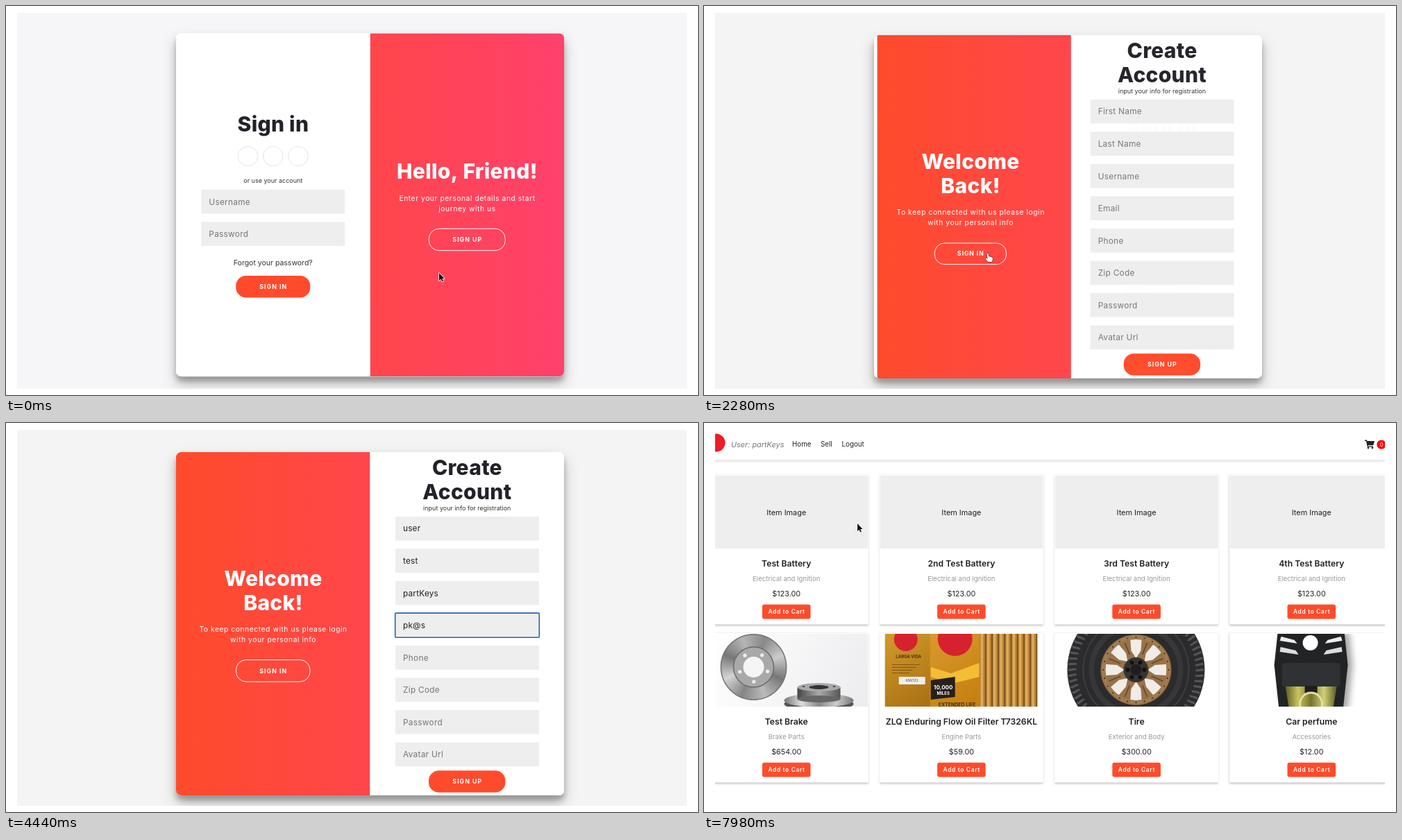
Write an HTML page with a canvas that moves like this. It is 997 px wide and 561 px high and loops after 8 s.

```html
<!DOCTYPE html>
<html lang="en">
<head>
<meta charset="utf-8">
<title>Sign up flow</title>
<style>
html, body { margin: 0; width: 100%; height: 100%; overflow: hidden; background: #fff; }
canvas { display: block; }
</style>
</head>
<body>
<canvas id="stage" width="997" height="561"></canvas>
<script>
const ctx = document.getElementById('stage').getContext('2d');
const LOOP = 8000, SHIFT_AT = 450, SHOP_AT = 6990;
const CARD = { x: 245, y: 42, w: 559, h: 495 }, HALF = CARD.w / 2;
const ORANGE = '#ff4b2b';
const SLIDES = [{ at: 1268, to: 1 }, { at: 2258, to: 0 }, { at: 2770, to: 1 }];
const SLIDE_MS = 260;

const clamp = v => Math.max(0, Math.min(1, v));
const smooth = v => v * v * (3 - 2 * v);
const easeInOut = v => v < .5 ? 2 * v * v : 1 - 2 * (1 - v) ** 2;

function text(str, x, y, size, o = {}) {
  ctx.font = `${o.style || ''} ${o.weight || 400} ${size}px Inter, sans-serif`;
  ctx.letterSpacing = (o.gap || 0) + 'px';
  ctx.textAlign = o.align || 'center';
  ctx.fillStyle = o.color || '#333';
  const nudge = ctx.textAlign === 'center' ? (o.gap || 0) / 2 : 0;
  ctx.fillText(str, x + nudge, y + size * .364);
}
function rect(x, y, w, h, color) {
  ctx.fillStyle = color;
  ctx.fillRect(x, y, w, h);
}
function roundPath(x, y, w, h, r) {
  ctx.beginPath();
  ctx.roundRect(x, y, w, h, r);
}
function poly(points, color) {
  ctx.beginPath();
  points.forEach(([x, y]) => ctx.lineTo(x, y));
  ctx.closePath();
  ctx.fillStyle = color;
  ctx.fill();
}
function ellipse(x, y, rx, ry, color) {
  ctx.beginPath();
  ctx.ellipse(x, y, rx, ry, 0, 0, Math.PI * 2);
  ctx.fillStyle = color;
  ctx.fill();
}
const disc = (x, y, r, color) => ellipse(x, y, r, r, color);
function ring(x, y, r, width, color) {
  ctx.beginPath();
  ctx.arc(x, y, r, 0, Math.PI * 2);
  ctx.lineWidth = width;
  ctx.strokeStyle = color;
  ctx.stroke();
}
function gradient(x0, y0, x1, y1, ...colors) {
  const g = ctx.createLinearGradient(x0, y0, x1, y1);
  colors.forEach((c, i) => g.addColorStop(i / (colors.length - 1), c));
  return g;
}
function scoped(draw) {
  ctx.save();
  draw();
  ctx.restore();
}
function clipRect(x, y, w, h) {
  ctx.beginPath();
  ctx.rect(x, y, w, h);
  ctx.clip();
}

// ---------- sign in / sign up card ----------

function slideState(t) {
  let state = { p: 0, back: false };
  for (const s of SLIDES) {
    if (t < s.at) break;
    const e = easeInOut(clamp((t - s.at) / SLIDE_MS));
    state = { p: s.to ? e : 1 - e, back: !s.to };
  }
  return state;
}
function pressScale(t, release) {
  const down = clamp((t - release + 80) / 35), up = clamp((t - release) / 60);
  return 1 - .05 * (down - up);
}
const title = (str, x, y, color = '#222228') =>
  text(str, x, y, 30, { weight: 800, gap: .3, color });

function button(label, x, y, w, ghost, scale = 1) {
  scoped(() => {
    ctx.translate(x, y);
    ctx.scale(scale, scale);
    roundPath(-w / 2, -15.8, w, 31.6, 14.6);
    if (ghost) {
      ctx.strokeStyle = '#fff';
      ctx.lineWidth = 1;
      ctx.stroke();
    } else {
      ctx.fillStyle = ORANGE;
      ctx.fill();
    }
    text(label, 0, 0, 8.8, { weight: 700, gap: 1, color: '#fff' });
  });
}
function field(label, x, y) {
  rect(x, y, 207, 34.6, '#eee');
  if (label) text(label, x + 11, y + 17.4, 11.8, { align: 'left', gap: .3, color: '#777' });
}

const SIGN_UP_FIELDS = [
  { label: 'First Name', value: 'user', from: 3300, to: 3500 },
  { label: 'Last Name', value: 'test', from: 3600, to: 3800 },
  { label: 'Username', value: 'partKeys', from: 3890, to: 4260 },
  { label: 'Email', value: 'pk@store.invalid', from: 4340, to: 4820 },
  { label: 'Phone', value: '55500199', from: 4870, to: 5130 },
  { label: 'Zip Code', value: '123456', from: 5190, to: 5330 },
  { label: 'Password', value: '********', from: 5360, to: 5480 },
  { label: 'Avatar Url', value: 'NA', from: 5520, to: 5570 }
];
const FOCUS_AT = 3230, BLUR_AT = 6640;

function signUpField(f, i, x, t) {
  const y = 134.8 + i * 46.54;
  const len = f.value.length;
  const typed = t < f.from ? '' : f.value.slice(0, 1 + Math.floor(clamp((t - f.from) / (f.to - f.from)) * (len - 1)));
  field(typed ? '' : f.label, x, y);
  let end = x + 11;
  if (f.label === 'Password') {
    for (let k = 0; k < typed.length; k++) disc(x + 12.5 + k * 3.5, y + 17.2, .95, '#222');
    end += typed.length * 3.5;
  } else if (typed) {
    text(typed, x + 11, y + 17.4, 11.8, { align: 'left', gap: .2, color: '#222' });
    end += ctx.measureText(typed).width;
  }
  const start = i ? SIGN_UP_FIELDS[i - 1].to + 40 : FOCUS_AT;
  const stop = i < 7 ? f.to + 40 : BLUR_AT;
  if (t >= start && t < stop) {
    roundPath(x - .3, y - .3, 207.6, 35.2, 1.5);
    ctx.lineWidth = 1.6;
    ctx.strokeStyle = '#2463b8';
    ctx.stroke();
    if (Math.floor(t / 200) % 2) rect(end + .5, y + 10.5, .9, 14, '#222');
  }
}

function signInForm(x) {
  rect(x, CARD.y, HALF, CARD.h, '#fff');
  const mid = x + HALF / 2;
  title('Sign in', mid, 173);
  [-36.3, 0, 36.3].forEach(dx => ring(mid + dx, 219.4, 14.2, .8, '#ddd'));
  text('or use your account', mid, 255, 9);
  field('Username', x + 36.3, 267.7);
  field('Password', x + 36.3, 314.2);
  text('Forgot your password?', mid, 373.4, 10.5);
  button('SIGN IN', mid, 407.6, 107, false);
}
function signUpForm(x, t) {
  rect(x, CARD.y, HALF, CARD.h, '#fff');
  const mid = x + HALF / 2;
  title('Create', mid, 64);
  title('Account', mid, 99);
  text('input your info for registration', mid, 122.3, 9);
  SIGN_UP_FIELDS.forEach((f, i) => signUpField(f, i, x + 36.5, t));
  button('SIGN UP', mid, 517, 110.5, false, pressScale(t, 6680));
}
function overlay(p, t) {
  const x = CARD.x + HALF * (1 - p);
  clipRect(x, CARD.y, HALF, CARD.h);
  rect(x, CARD.y, HALF, CARD.h, gradient(CARD.x, 0, CARD.x + CARD.w, 0, ORANGE, '#ff416c'));
  const note = (str, cx, y) => text(str, cx, y, 10.3, { gap: .55, color: '#fff' });

  const left = CARD.x + HALF / 2 - HALF * .2 * (1 - p);
  title('Welcome', left, 223.8, '#fff');
  title('Back!', left, 258.8, '#fff');
  note('To keep connected with us please login', left, 297.6);
  note('with your personal info', left, 312.2);
  button('SIGN IN', left, 357.3, 106.5, true, pressScale(t, 2258));

  const right = CARD.x + HALF * 1.5 + HALF * .2 * p;
  title('Hello, Friend!', right, 241, '#fff');
  note('Enter your personal details and start', right, 280.3);
  note('journey with us', right, 294.9);
  button('SIGN UP', right, 339.7, 110, true, pressScale(t, 1268) * pressScale(t, 2770));
}
function shadow(dy, blur, alpha) {
  ctx.shadowColor = `rgba(0,0,0,${alpha})`;
  ctx.shadowOffsetY = dy;
  ctx.shadowBlur = blur;
  roundPath(CARD.x, CARD.y, CARD.w, CARD.h, 7.3);
  ctx.fillStyle = '#fff';
  ctx.fill();
}
function accountPage(t) {
  rect(16, 10, 965, 542, t < SHIFT_AT ? '#f6f6f8' : '#f4f4f4');
  if (t < SHIFT_AT) ctx.translate(0, -2.8);
  scoped(() => {
    shadow(10.2, 20.4, .25);
    shadow(7.3, 7.3, .22);
  });
  roundPath(CARD.x, CARD.y, CARD.w, CARD.h, 7.3);
  ctx.clip();
  const { p, back } = slideState(t);
  const x = CARD.x + HALF * p;
  signInForm(x);
  if (p > (back ? .375 : .499)) scoped(() => {
    ctx.globalAlpha = back ? p : 1;
    signUpForm(x, t);
  });
  scoped(() => overlay(p, t));
}

// ---------- shop page ----------

function brakePicture(x, y) {
  rect(x, y, 220, 105, gradient(x, y, x + 220, y + 105, '#ffffff', '#ececef'));
  const cx = x + 55, cy = y + 48;
  const metal = ctx.createConicGradient(.4, cx, cy);
  ['#777', '#bbb', '#858585', '#d4d4d4', '#777', '#b5b5b5', '#888', '#ccc', '#777']
    .forEach((c, i) => metal.addColorStop(i / 8, c));
  disc(cx, cy, 48, metal);
  ring(cx, cy, 47, 1.5, '#777');
  disc(cx, cy, 29, '#a9a9ab');
  ring(cx, cy, 29, 1.5, '#6b6b6b');
  disc(cx, cy, 15, '#f5f5f6');
  for (let i = 0; i < 5; i++) {
    const a = i * Math.PI * .4 + .3;
    disc(cx + 21 * Math.cos(a), cy + 21 * Math.sin(a), 2.6, '#eee');
  }
  const fx = x + 149;
  ellipse(fx, y + 101, 50, 10, '#555');
  ellipse(fx, y + 96, 50, 10, gradient(fx - 50, 0, fx + 50, 0, '#777', '#ddd', '#888', '#ccc', '#777'));
  rect(fx - 31, y + 77, 62, 17, gradient(fx - 31, 0, fx + 31, 0, '#444', '#aaa', '#555'));
  ellipse(fx, y + 94, 31, 5, '#666');
  ellipse(fx, y + 77, 31, 6, '#a8a8a8');
  ellipse(fx, y + 77, 14, 3, '#333');
  [-22, -10, 11, 22].forEach(dx => ellipse(fx + dx, y + 76, 2, 1, '#444'));
}
function filterPicture(x, y) {
  rect(x, y, 66, 105, gradient(x, y, x + 66, y + 105, '#d19a2b', '#a96f12'));
  rect(x + 65, y, 73, 105, gradient(x + 65, y, x + 138, y + 105, '#d89a2c', '#c57d0e'));
  poly([[x + 66, y + 48], [x + 95, y + 57], [x + 136, y + 42], [x + 136, y + 62], [x + 96, y + 72], [x + 66, y + 62]], '#f3bd36');
  rect(x + 136, y, 83, 105, '#bd8435');
  for (let i = 0; i < 9; i++) {
    rect(x + 138 + i * 9.2, y, 3.4, 105, '#dbac5d');
    rect(x + 144 + i * 9.2, y, 2, 105, '#7e501b');
  }
  disc(x + 30, y + 8, 17, '#d5222e');
  disc(x + 101, y + 7, 25, '#d5222e');
  text('LARGA VIDA', x + 34, y + 33, 6, { weight: 700, color: '#4d3311' });
  for (let i = 0; i < 4; i++) rect(x + 10, y + 44 + i * 4, 40 - i * 5, 1, '#7f5718');
  rect(x + 20, y + 62, 38, 11, '#eee');
  text('KM/123', x + 39, y + 67.5, 5, { color: '#444' });
  poly([[x + 66, y + 67], [x + 101, y + 62], [x + 101, y + 91], [x + 66, y + 95]], '#271f1a');
  text('10,000', x + 84, y + 77, 8, { weight: 700, color: '#fff' });
  text('MILES', x + 84, y + 86, 6, { weight: 700, color: '#fff' });
  text('EXTENDED LIFE', x + 104, y + 102, 7, { weight: 700, color: '#4a2c0b' });
}
function tirePicture(x, y) {
  const cx = x + 117.5, cy = y + 52;
  disc(cx, cy, 99, '#2b2b2d');
  for (let i = 0; i < 72; i++) {
    const a = i * Math.PI / 36;
    poly([[96, -.02], [100, .01], [87, .03], [85, 0]]
      .map(([r, d]) => [cx + r * Math.cos(a + d), cy + r * Math.sin(a + d)]), '#555558');
  }
  ring(cx, cy, 76, 2, '#3e3e41');
  ring(cx, cy, 64, 8, '#373739');
  disc(cx, cy, 51, '#8b673f');
  disc(cx, cy, 44, '#f1ece6');
  for (let i = 0; i < 8; i++) scoped(() => {
    ctx.translate(cx, cy);
    ctx.rotate(i * Math.PI / 4 + Math.PI / 8);
    poly([[8, -8], [28, -4], [46, -10], [46, 10], [28, 4], [8, 8]], '#98734a');
    rect(24, -1, 18, 2, '#6d4d2b');
  });
  ring(cx, cy, 47, 5, '#a17c50');
  for (let i = 0; i < 24; i++) {
    const a = i * Math.PI / 12;
    disc(cx + 47 * Math.cos(a), cy + 47 * Math.sin(a), 1.1, '#3a2b1b');
  }
  disc(cx, cy, 18, '#37332f');
  for (let i = 0; i < 6; i++) {
    const a = i * Math.PI / 3;
    disc(cx + 12 * Math.cos(a), cy + 12 * Math.sin(a), 3, '#111');
  }
  disc(cx, cy, 8, '#1e1e20');
}
function perfumePicture(x, y) {
  const cx = x + 117.5;
  ctx.shadowColor = 'rgba(0,0,0,.35)';
  ctx.shadowBlur = 10;
  ctx.shadowOffsetX = 7;
  poly([[cx - 48, y - 2], [cx + 48, y - 2], [cx + 53, y + 45], [cx + 46, y + 110], [cx - 46, y + 110], [cx - 53, y + 45]], '#222325');
  ctx.shadowColor = 'transparent';
  [-1, 1].forEach(s => {
    poly([[cx + s * 43, y + 4], [cx + s * 24, y + 9], [cx + s * 20, y + 14], [cx + s * 45, y + 10]], '#eee');
    poly([[cx + s * 44, y + 19], [cx + s * 22, y + 24], [cx + s * 18, y + 30], [cx + s * 45, y + 26]], '#ddd');
  });
  disc(cx - 1, y + 13, 11, '#fff');
  roundPath(cx - 42, y + 42, 84, 34, 4);
  ctx.fillStyle = '#303134';
  ctx.fill();
  poly([[cx - 37, y + 76], [cx + 37, y + 76], [cx + 32, y + 106], [cx - 32, y + 106]],
    gradient(cx - 37, 0, cx + 37, 0, '#5d5d24', '#c9c45e', '#76742c', '#d3cf77', '#5b5a22'));
  rect(cx - 9, y + 75, 18, 10, '#1c1d1e');
  ring(cx, y + 101, 16, 3, '#e4df9b');
}

const ELECTRIC = 'Electrical and Ignition';
const ITEMS = [
  ['Test Battery', ELECTRIC, '$123.00'],
  ['2nd Test Battery', ELECTRIC, '$123.00'],
  ['3rd Test Battery', ELECTRIC, '$123.00'],
  ['4th Test Battery', ELECTRIC, '$123.00'],
  ['Test Brake', 'Brake Parts', '$654.00', brakePicture, 16],
  ['ZLQ Enduring Flow Oil Filter T7326KL', 'Engine Parts', '$59.00', filterPicture, 8],
  ['Tire', 'Exterior and Body', '$300.00', tirePicture, 0],
  ['Car perfume', 'Accessories', '$12.00', perfumePicture, 0]
];

function itemCard([name, kind, price, picture, inset], i) {
  const x = .5 + (i % 4) * 252.2, y = 75 + Math.floor(i / 4) * 228, mid = x + 118.2;
  scoped(() => {
    ctx.shadowColor = 'rgba(0,0,0,.28)';
    ctx.shadowBlur = 3;
    ctx.shadowOffsetY = 1;
    rect(x, y, 236.4, 215.5, '#fff');
  });
  if (picture) scoped(() => {
    clipRect(x + 1, y + 1, 234.4, 105);
    picture(x + inset, y + 1);
  });
  else {
    rect(x + 1, y + 1, 234.4, 105, '#eee');
    text('Item Image', mid, y + 53.7, 10.9, { color: '#222' });
  }
  text(name, mid, y + 127.2, 12.2, { weight: 600, color: '#212121' });
  text(kind, mid, y + 149.8, 9.6, { color: '#999' });
  text(price, mid, y + 171.3, 10.8, { color: '#222' });
  roundPath(mid - 34.8, y + 186.8, 69.6, 20.6, 3);
  ctx.fillStyle = ORANGE;
  ctx.fill();
  text('Add to Cart', mid, y + 197.1, 8.3, { weight: 600, gap: .7, color: '#fff' });
}
function cartIcon(x, y) {
  poly([[x, y], [x + 3, y], [x + 3.5, y + 1.5], [x + 14, y + 1.5], [x + 12.4, y + 7.5], [x + 4.8, y + 7.5],
    [x + 5, y + 8.7], [x + 12, y + 8.7], [x + 12, y + 10], [x + 3.8, y + 10], [x + 2, y + 1.4], [x, y + 1.4]], '#222');
  disc(x + 5, y + 11.3, 1.4, '#222');
  disc(x + 11, y + 11.3, 1.4, '#222');
}
function shopPage() {
  disc(17.5, 28.5, 13, '#ee1c25');
  const link = (str, x) => text(str, x, 30.7, 9.8, { align: 'left', color: '#222' });
  text('User: partKeys', 39, 30.7, 10.9, { align: 'left', style: 'italic', color: '#777' });
  link('Home', 127);
  link('Sell', 168);
  link('Logout', 198.5);
  cartIcon(952, 24.5);
  disc(976, 31, 6.6, '#f00');
  text('0', 976.3, 31, 8, { color: '#fff' });
  rect(16, 53, 965, 4, gradient(0, 53, 0, 57, '#e6e6e6', '#f5f5f5'));
  ITEMS.forEach(itemCard);
}

// ---------- pointer ----------

const POINTER_PATH = [
  [450, 624, 385], [900, 663, 337], [1380, 663, 337], [2100, 409, 357], [2290, 409, 357],
  [2580, 617, 357], [2700, 663, 338], [2880, 663, 338], [3180, 692, 156], [5480, 692, 156],
  [5580, 693, 186], [5900, 778, 538], [6280, 664, 513], [7020, 664, 513], [7900, 221, 145]
];
const HAND_TIMES = [[820, 1420], [2040, 2330], [2660, 2910], [6220, SHOP_AT]];
const within = (t, [a, b]) => t >= a && t < b;

function pointerAt(t) {
  const path = POINTER_PATH, i = path.findIndex(k => k[0] > t);
  if (i === 0) return path[0].slice(1);
  if (i < 0) return path[path.length - 1].slice(1);
  const [t0, x0, y0] = path[i - 1], [t1, x1, y1] = path[i];
  const e = smooth((t - t0) / (t1 - t0));
  return [x0 + (x1 - x0) * e, y0 + (y1 - y0) * e];
}
function drawPointer(t) {
  if (within(t, [3280, 5500])) return;
  const hand = HAND_TIMES.some(span => within(t, span));
  const shape = hand
    ? 'M-1.6 1Q-.6-.7.6.8L1.6 4.6Q3 3.7 3.6 5Q5 4.3 5.5 5.7Q6.8 5.4 6.9 6.8L6.8 9.2L5.7 12H.6L-3.2 8Q-3.9 6.6-2.4 6.6L-.4 7.7Z'
    : 'M0 0V11L2.5 8.7L4.2 12.5L5.9 11.8L4.3 8.1L7.6 7.9Z';
  ctx.translate(...pointerAt(t));
  const path = new Path2D(shape);
  ctx.lineJoin = 'round';
  ctx.lineWidth = hand ? 1 : 1.6;
  ctx.strokeStyle = hand ? '#111' : '#fff';
  ctx.fillStyle = hand ? '#fff' : '#111';
  ctx.stroke(path);
  ctx.fill(path);
}

function render(t) {
  rect(0, 0, 997, 561, '#fff');
  scoped(() => {
    clipRect(16, 10, 965, 542);
    scoped(() => t < SHOP_AT ? accountPage(t) : shopPage());
    drawPointer(t);
  });
}
const startTime = performance.now();
function frame() {
  render((performance.now() - startTime) % LOOP);
  requestAnimationFrame(frame);
}
frame();
</script>
</body>
</html>
```
